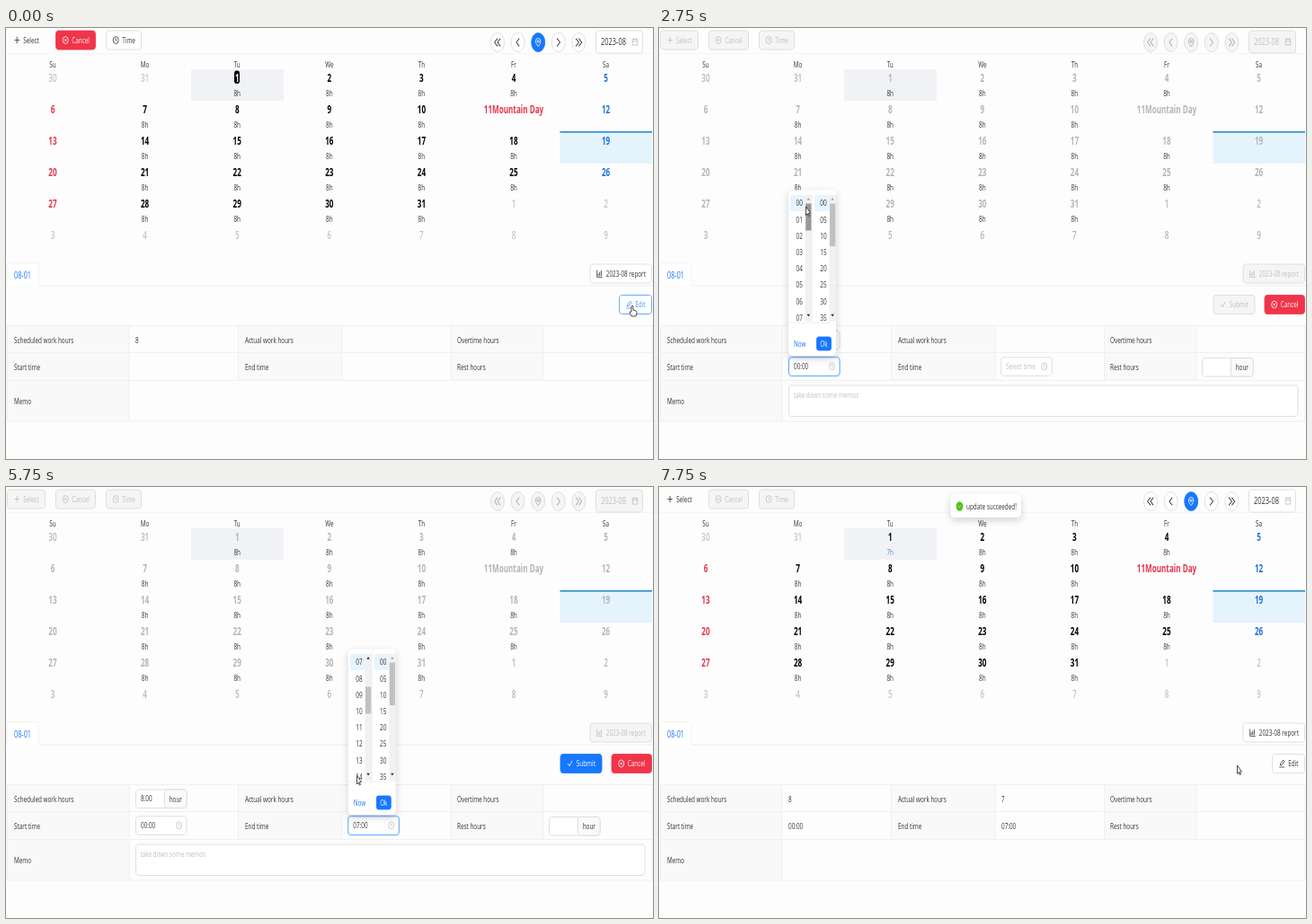
These frames come from a looping animation (720x480 px, 7.88 s). An HTML page with a canvas:

```html
<!DOCTYPE html>
<html lang="en">
<head>
<meta charset="utf-8">
<title>Work calendar</title>
<style>
html, body { margin: 0; width: 100%; height: 100%; overflow: hidden; background: #fdfdfd; }
canvas { display: block; width: 720px; height: 480px; }
</style>
</head>
<body>
<canvas id="stage" width="720" height="480"></canvas>
<script>
const ctx = document.getElementById('stage').getContext('2d');
const LOOP = 7880, STEP = 125;
const SQUEEZE = 0.67; // the whole page is shown narrower than it is tall
const INK = '#333', GREY = '#bfbfbf', LINE = '#f0f0f0', EDGE = '#d9d9d9';
const BLUE = '#1677ff', RED = '#f0344a', PALE = '#e6f4ff';

// moments of the scene, in ms
const EDIT = 375, OPEN1 = 1410, PICK1 = 2300, OK1 = 3250;
const OPEN2 = 4125, PICK2 = 5125, OK2 = 6075, SUBMIT = 6875, DONE = 7250;

const RING = 'M-6 0A6 6 0 1 1 6 0A6 6 0 1 1-6 0';
const ICONS = {
  plus: 'M-5.5 0H5.5M0-5.5V5.5',
  cancel: RING + 'M-2-2L2 2M2-2L-2 2',
  clock: RING + 'M0-3.5V.5L2.5 2',
  check: 'M-5 0L-1.5 4L5-4.5',
  chart: 'M-6-6V6H6M-3 4V0M0 4V-3M3.5 4V-5',
  edit: 'M-3.5 3L-3 0L3-6L5.5-3.5L-.5 2.5ZM-6 6H6',
  calendar: 'M-5.5-4.5H5.5V5.5H-5.5ZM-5.5-1H5.5M-3-6.5V-3M3-6.5V-3',
  pin: 'M0 7C-3 4-5.5 1-5.5-1.5A5.5 5.5 0 0 1 5.5-1.5C5.5 1 3 4 0 7ZM-2-1.5A2 2 0 1 1 2-1.5A2 2 0 1 1-2-1.5',
  prev: 'M3-6L-3 0L3 6',
  next: 'M-3-6L3 0L-3 6',
  first: 'M0-6L-6 0L0 6M6-6L0 0L6 6',
  last: 'M0-6L6 0L0 6M-6-6L0 0L-6 6'
};
const CURSORS = {
  hand: 'M-1 1Q0-1 1 1V5L4 6Q5 6.5 5 8L4 12H-1L-3 8Q-3.5 6.5-1 7Z',
  arrow: 'M0 0V9.5L1.7 7.7L2.9 10.5L4 10L2.8 7.3L5 7Z',
  beam: 'M-1.5-5.5H1.5M0-5.5V5.5M-1.5 5.5H1.5'
};
// time, x, y, shape from here on
const PATH = [
  [0, 697, 309, 'hand'], [500, 697, 309, 'arrow'], [1250, 169, 373, 'beam'],
  [1750, 169, 373, 'arrow'], [2125, 157, 196, 'hand'], [2500, 157, 196, 'arrow'],
  [2750, 163.5, 199, 'arrow'], [3125, 183, 350, 'hand'], [3375, 183, 350, 'arrow'],
  [4000, 405, 377, 'beam'], [4250, 405, 377, 'arrow'], [4500, 387, 313, 'hand'],
  [4625, 385.5, 310.5, 'hand'], [5000, 391, 320, 'hand'], [5375, 390.5, 321.5, 'arrow'],
  [5750, 390.5, 321.5, 'arrow'], [6000, 420, 350, 'hand'], [6125, 420, 350, 'arrow'],
  [6375, 650, 311, 'hand'], [7125, 650, 311, 'arrow'], [7625, 643.5, 310, 'arrow']
];

const clamp = v => Math.max(0, Math.min(1, v));
const easeOut = v => 1 - (1 - clamp(v)) ** 5;
const pad = n => String(n).padStart(2, '0');

function rect(x, y, w, h, color) {
  ctx.fillStyle = color;
  ctx.fillRect(x, y, w, h);
}

function box(x, y, w, h, fill, edge, r = 3) {
  ctx.beginPath();
  ctx.roundRect(x, y, w, h, [{ x: r, y: r * 1.36 }]);
  ctx.fillStyle = fill;
  ctx.fill();
  if (!edge) return;
  ctx.strokeStyle = edge;
  ctx.lineWidth = 0.8;
  ctx.stroke();
}

function raised(x, y, w, h) {
  ctx.save();
  ctx.shadowColor = 'rgba(0,0,0,.18)';
  ctx.shadowBlur = 9;
  ctx.shadowOffsetY = 3;
  box(x, y, w, h, '#fff', null, 4);
  ctx.restore();
}

// y is the middle of the capitals
function text(s, x, y, color = INK, size = 9.5, align = 'left', weight = 400) {
  ctx.save();
  ctx.translate(x, y + size * 0.357);
  ctx.scale(SQUEEZE, 1);
  ctx.font = `${weight} ${size}px "Open Sans", "Noto Sans", sans-serif`;
  ctx.textAlign = align;
  ctx.fillStyle = color;
  ctx.fillText(s, 0, 0);
  ctx.restore();
}

function icon(name, x, y, color, zoom = 1) {
  ctx.save();
  ctx.translate(x, y);
  ctx.scale(0.5 * zoom, 0.66 * zoom);
  ctx.strokeStyle = color;
  ctx.lineWidth = 1.4;
  ctx.stroke(new Path2D(ICONS[name]));
  ctx.restore();
}

const LOOKS = {
  plain: ['#fff', EDGE, INK],
  bare: ['#fdfdfd', null, INK],
  hover: ['#fff', '#4096ff', '#4096ff'],
  off: ['#f5f5f5', EDGE, GREY],
  red: [RED, RED, '#fff'],
  blue: [BLUE, BLUE, '#fff']
};

function button(x, y, w, label, name, look) {
  const [fill, edge, color] = LOOKS[look];
  box(x, y, w, 21, fill, edge);
  icon(name, x + 10.7, y + 10.5, color);
  text(label, x + 17.8, y + 10.5, color);
}

function toolbar(edit, done) {
  rect(0, 28, 720, 1, '#f5f5f5');
  button(1.5, 3, 42, 'Select', 'plus', edit ? 'off' : 'bare');
  button(55.5, 3, 44, 'Cancel', 'cancel', edit || done ? 'off' : 'red');
  button(111.5, 3, 39, 'Time', 'clock', edit || done ? 'off' : 'plain');
  ['first', 'prev', 'pin', 'next', 'last'].forEach((name, i) => {
    const x = 547 + i * 22.6, main = name === 'pin' && !edit;
    ctx.beginPath();
    ctx.ellipse(x, 16, 7.5, 10.5, 0, 0, 7);
    ctx.fillStyle = main ? BLUE : edit ? '#f5f5f5' : '#fff';
    ctx.fill();
    ctx.strokeStyle = main ? BLUE : EDGE;
    ctx.lineWidth = 0.8;
    ctx.stroke();
    icon(name, x, 16, main ? '#fff' : edit ? '#a6a6a6' : '#222', name === 'pin' ? 1 : 1.1);
  });
  box(656.5, 3, 52, 25, edit ? '#f5f5f5' : '#fff', EDGE);
  text('2023-08', 662, 15.5, edit ? GREY : INK, 11.1);
  icon('calendar', 700, 15.5, GREY);
}

function calendar(edit, done) {
  rect(206, 46, 103, 35, '#f1f2f6');
  rect(616.5, 115, 102.5, 36, '#e4f3fc');
  rect(616.5, 115, 102.5, 1.6, '#2b8acb');
  ['Su', 'Mo', 'Tu', 'We', 'Th', 'Fr', 'Sa'].forEach((day, c) =>
    text(day, 52 + c * 102.6, 41, INK, 9.5, 'center'));
  for (let i = 0; i < 42; i++) {
    const c = i % 7, x = 52 + c * 102.6, y = 55.5 + Math.floor(i / 7) * 34.95;
    const n = i - 1, inside = n >= 1 && n <= 31, holiday = n === 11;
    const day = n < 1 ? n + 31 : n > 31 ? n - 31 : n;
    let color = '#000';
    if (edit || !inside) color = edit ? '#b5b5b5' : '#c4c4c4';
    else if (c === 0 || holiday) color = '#e4364d';
    else if (c === 6) color = '#1f6fe0';
    if (n === 1 && !edit && !done) {
      box(254, 47.5, 6, 14.5, '#000', null, 2);
      color = '#fff';
    }
    text(holiday ? '11Mountain Day' : day, x, y, color, 12.1, 'center', inside ? 700 : 600);
    if (inside && c % 6 && !holiday) {
      const short = done && n === 1;
      text(short ? '7h' : '8h', x, y + 16.8, short ? '#5b8fd6' : INK, 9.6, 'center');
    }
  }
}

function input(x, y, value, hint, focus) {
  if (focus) box(x - 1.2, y - 1.5, 59, 23.5, '#dcebff', null, 4);
  box(x, y, 56.5, 20.5, '#fff', focus ? '#4096ff' : EDGE);
  text(value || hint, x + 5.5, y + 9.8, value ? INK : GREY);
  icon('clock', x + 48, y + 10, GREY);
}

function hours(x, y, value) {
  box(x, y, 56.5, 20.5, '#fff', EDGE);
  box(x + 32, y, 24.5, 20.5, '#fafafa', EDGE);
  text(value, x + 5.5, y + 10);
  text('hour', x + 44.3, y + 10.6, INK, 9.5, 'center');
}

function details(t, edit, done) {
  rect(36, 286.5, 684, 1, LINE);
  box(1, 261.5, 35, 26, '#fff', LINE);
  rect(1.5, 285, 34, 4, '#fdfdfd');
  text('08-01', 18.5, 275, BLUE, 10.8, 'center');
  button(650, 263, 68.5, '2023-08 report', 'chart', edit ? 'off' : 'plain');
  if (edit) {
    button(617, 297.5, 46, 'Submit', 'check', t >= OK1 ? 'blue' : 'off');
    button(674, 297.5, 44.5, 'Cancel', 'cancel', 'red');
  } else {
    button(682.5, 297.5, 36, 'Edit', 'edit', done ? 'plain' : 'hover');
  }

  for (const [x, w] of [[1, 136], [258, 115.5], [495, 102.5]]) rect(x, 331.5, w, 61, '#f9f9f9');
  rect(1, 392.5, 136, 45.5, '#f9f9f9');
  for (const y of [331, 361, 392, 437.5]) rect(1, y, 718, 1, LINE);
  for (const x of [258, 373.5, 495, 597.5]) rect(x, 331, 1, 61, LINE);
  for (const x of [1, 136.5, 718.5]) rect(x, 331, 1, 107, LINE);
  text('Scheduled work hours', 9, 347.5);
  text('Actual work hours', 266, 347.5);
  text('Overtime hours', 502, 347.5);
  text('Start time', 9, 377.5);
  text('End time', 266, 377.5);
  text('Rest hours', 502, 377.5);
  text('Memo', 9, 416);

  if (!edit) {
    text('8', 144, 347.5);
    if (done) {
      text('7', 381, 347.5);
      text('00:00', 144, 377.5);
      text('07:00', 381, 377.5);
    }
    return;
  }
  hours(144.5, 337, '8.00');
  hours(604.5, 367.5, '');
  input(144.5, 366.8, t >= PICK1 && '00:00', 'Select time', t >= OPEN1 - 100 && t < OK1);
  input(380.8, 366.8, t >= PICK2 && '07:00', 'Select time', t >= OPEN2 && t < SUBMIT);
  box(144.5, 398, 566.5, 34.5, '#fff', EDGE);
  text('take down some memos', 149.5, 408.5, GREY);
}

function triangle(x, y, dir, color) {
  ctx.beginPath();
  ctx.moveTo(x - 1.8, y + 1.2 * dir);
  ctx.lineTo(x + 1.8, y + 1.2 * dir);
  ctx.lineTo(x, y - 1.6 * dir);
  ctx.fillStyle = color;
  ctx.fill();
}

// one scrolling list of a time picker
function column(x, count, step, scroll, chosen, held) {
  const row = 18.2, top = 185.5, view = 141.5;
  const share = 125 / (row * (count - 1) + view + 30);
  ctx.save();
  ctx.beginPath();
  ctx.rect(x, top, 27, view);
  ctx.clip();
  for (let i = 0; i < count; i++) {
    const y = 195 + (i - scroll) * row;
    if (i === chosen) box(x + 2, y - 9.2, 17, 18.2, PALE, null, 2);
    text(pad(i * step), x + 12.2, y, INK, 9.6, 'center');
  }
  rect(x + 18.7, top, 7.3, view, '#f1f1f1');
  rect(x + 19.2, 195.5 + scroll * row * share, 6.3, view * share, held ? '#999' : '#c1c1c1');
  triangle(x + 22.3, 190.5, 1, scroll > 0 ? '#333' : '#a3a3a3');
  triangle(x + 22.3, 320, -1, '#333');
  ctx.restore();
}

function picker(t, x, open, pick, close, hour) {
  if (t < open || t >= close + 200) return;
  const shown = t < close ? easeOut((t - open) / 200) : 1 - clamp((t - close) / 200) ** 3;
  const picked = t >= pick;
  ctx.save();
  ctx.globalAlpha = shown;
  ctx.translate(0, 365);
  ctx.scale(1, 0.8 + 0.2 * shown);
  ctx.translate(0, -365);
  raised(x, 180.5, 53, 184.5);
  rect(x, 328, 53, 0.8, LINE);
  rect(x + 26.5, 181, 0.7, 147, LINE);
  const scroll = picked ? hour * clamp((t - pick) / 120) : 0;
  column(x, 24, 1, scroll, picked ? hour : -1, hour === 0 && t >= 2625 && t < 2875);
  column(x + 26.8, 12, 5, 0, picked ? 0 : -1);
  text('Now', x + 12.7, 352, BLUE, 9.5, 'center');
  box(x + 31.5, 344, 16, 15, picked ? BLUE : '#f5f5f5', picked ? BLUE : EDGE, 2);
  text('Ok', x + 39.5, 352, picked ? '#fff' : GREY, 9.5, 'center');
  ctx.restore();
}

function toast(t) {
  const p = easeOut((t - DONE) / 300);
  if (p <= 0) return;
  ctx.save();
  ctx.globalAlpha = p;
  ctx.translate(0, -26 * (1 - p));
  raised(324.5, 8, 78.5, 26);
  ctx.beginPath();
  ctx.ellipse(334.5, 21.5, 3.9, 5.2, 0, 0, 7);
  ctx.fillStyle = '#52c41a';
  ctx.fill();
  icon('check', 334.5, 21.5, '#fff', 0.5);
  text('update succeeded!', 342, 21.5);
  ctx.restore();
}

function cursor(t) {
  const i = PATH.findLastIndex(p => p[0] <= t);
  const [t0, x0, y0, shape] = PATH[i], [t1, x1, y1] = PATH[i + 1] || [t0 + 1, x0, y0];
  const p = clamp((t - t0) / (t1 - t0)), k = p * p * (3 - 2 * p);
  const path = new Path2D(CURSORS[shape]);
  ctx.save();
  ctx.translate(x0 + (x1 - x0) * k, y0 + (y1 - y0) * k);
  ctx.fillStyle = '#fff';
  ctx.fill(path);
  ctx.strokeStyle = '#222';
  ctx.lineWidth = 0.8;
  ctx.stroke(path);
  ctx.restore();
}

function draw(now) {
  // the screen is refreshed eight times a second
  const t = Math.min(62, Math.floor((now % LOOP + 5) / STEP)) * STEP;
  const done = t >= DONE, edit = t >= EDIT && !done;
  rect(0, 0, 720, 480, '#fdfdfd');
  toolbar(edit, done);
  calendar(edit, done);
  details(t, edit, done);
  picker(t, 144, OPEN1, PICK1, OK1, 0);
  picker(t, 380.8, OPEN2, PICK2, OK2, 7);
  toast(t);
  cursor(t);
}

let start;
function tick(now) {
  start ??= now;
  draw(now - start);
  requestAnimationFrame(tick);
}
requestAnimationFrame(tick);
</script>
</body>
</html>
```
